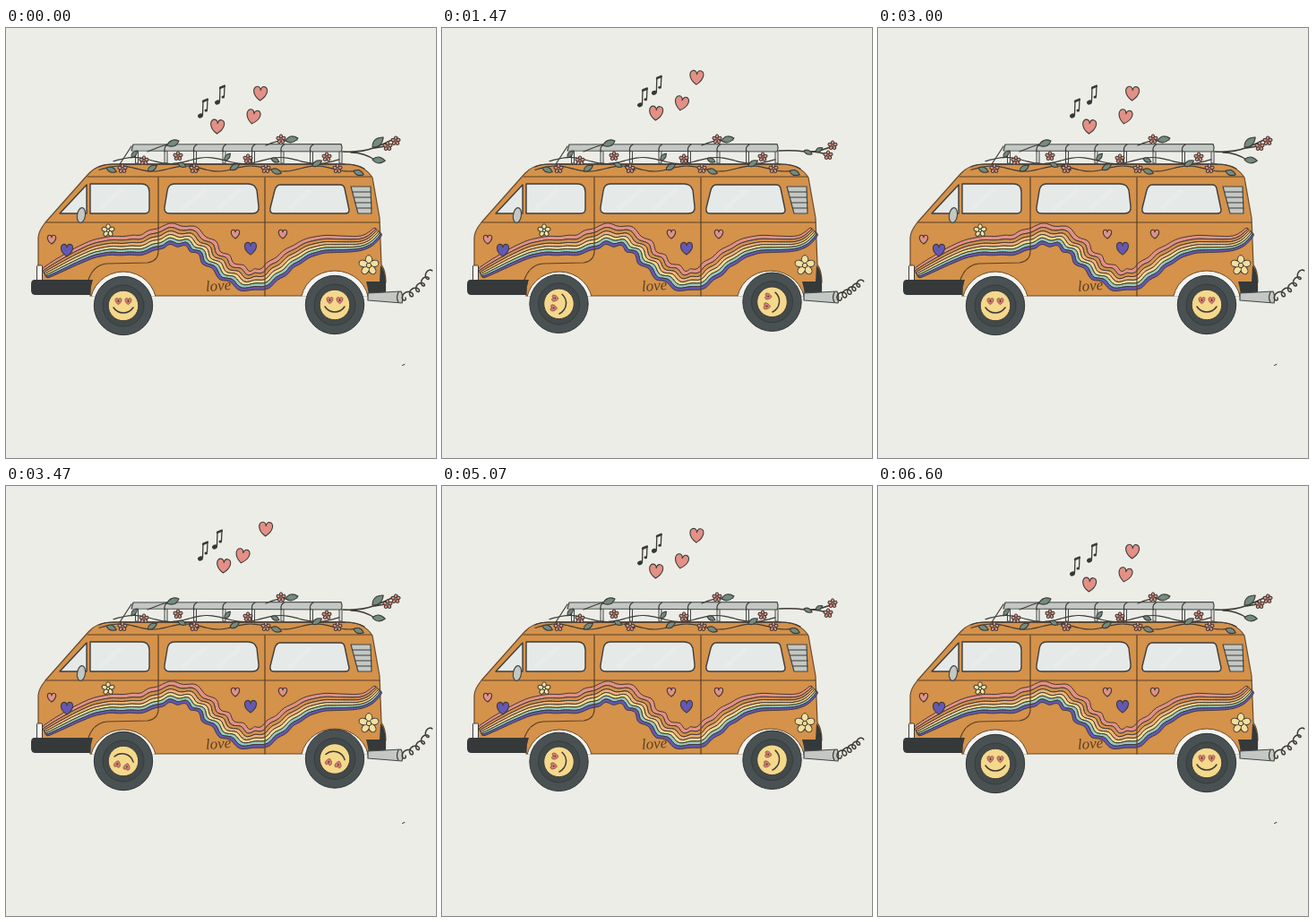
These frames come from a looping animation (480x480 px, 6.67 s). An HTML page:

```html
<!DOCTYPE html>
<html lang="en">
<head>
<meta charset="utf-8">
<title>Flower van</title>
<style>
  html, body { margin: 0; width: 100%; height: 100%; overflow: hidden; background: #ecede7; }
  svg { display: block; width: 100vw; height: 100vh; }
  .ink, .seam { fill: none; stroke: #3f3a36; stroke-width: 1.2; stroke-linecap: round; stroke-linejoin: round; }
  .seam { stroke: #5b4026; }
  .glass { fill: #e5e9e8; stroke: #3f3d3a; stroke-width: 1.4; stroke-linejoin: round; }
  .sheen { fill: none; stroke: #eef0ee; stroke-width: 5; opacity: .5; }
  .metal { fill: #c3c8c4; stroke: #454745; stroke-width: 1.2; stroke-linejoin: round; }
  .part { stroke: #3f3a36; stroke-width: 1; stroke-linejoin: round; }
  .lettering { font: italic 17px "Liberation Serif", serif; fill: #5c4024; }
</style>
</head>
<body>
<svg viewBox="0 0 480 480">
  <defs>
    <clipPath id="aboveSill"><path d="M0 0H480V299.600H0Z"/></clipPath>
  </defs>

  <path d="M36 290V234Q36 227 44 217L91 164Q101 152 118 152H378Q400 152 409 167L417 212L419 264Q424 271 424 284L404 299H94V290Z"
    fill="#d4924b" stroke="#6b4a2b" stroke-width="1.2"/>
  <path class="ink" d="M104 155Q110 152 120 152H378Q392 152 400 157"/>
  <g id="ribbon"></g>

  <path class="seam" d="M91 166H408M45 217H417M170 167V249Q170 260 158 262L113 263Q98 264 92 281M289 167V299"/>
  <g class="glass">
    <path d="M60 207L90 175V207Z"/>
    <path d="M94 174H151Q160 174 160 183V202Q160 207 155 207H94Z"/>
    <path d="M188 174H270Q278 174 280 181L282 199Q283 207 275 207H183Q176 207 177 200L180 182Q181 174 188 174Z"/>
    <path d="M306 175H373Q377 175 378 179L383 203Q383 207 379 207H299Q294 207 295 201L300 181Q302 175 306 175Z"/>
  </g>
  <path class="sheen" d="M104 202L130 180M196 202L224 180M236 202L262 180M316 202L340 181"/>
  <path class="metal" d="M385 177H407L408 207H393Z"/>
  <path class="ink" d="M387 183H407M389 189H407M390 195H408M392 201H408"/>
  <ellipse class="metal" cx="84" cy="209" rx="4.500" ry="8.500" transform="rotate(8 84 209)"/>

  <g clip-path="url(#aboveSill)" fill="#f3f3f0" stroke="#6b4a2b">
    <ellipse cx="131" cy="308" rx="37" ry="36"/>
    <ellipse cx="367" cy="307" rx="38" ry="36"/>
  </g>
  <rect class="part" x="34.500" y="265" width="6" height="17" rx="1" fill="#f4f4f1"/>
  <path d="M32 281H97Q94 289 94 298H33Q28 298 28 293V286Q28 281 32 281Z" fill="#35393a"/>
  <path d="M418 265Q425 272 424 295Q424 298 420 298H405Q404 290 402 283H417Z" fill="#35393a"/>
  <path class="metal" d="M404 296L441 294Q444 300 442 307L404 304Z"/>
  <path class="ink" d="M438 295Q435 301 438 306"/>
  <text class="lettering" x="223" y="293" transform="rotate(-4 238 289)">love</text>

  <g id="rack"></g>
  <g id="garden"></g>
  <g id="motion"></g>
</svg>

<script>
const CORAL = '#e39086', YELLOW = '#f4d88c', TEAL = '#94c9bb', PURPLE = '#6558b4', GREEN = '#718c80';
const HEART = 'M0 1C-1.3 .15-1.05-.95-.45-.95C-.15-.95 0-.65 0-.42C.05-.7 .25-.98 .5-.95C1.1-.9 1.2 .15 0 1Z';
const LEAF = 'M0 0Q.5-.55 1.1 0Q.5 .5 0 0Z';
const el = id => document.getElementById(id);
const range = (n, fn) => Array.from({ length: n }, (_, i) => fn(i));
const join = (n, fn) => range(n, fn).join('');

// Unit shape scaled by s, with an outline of constant weight
const shape = (d, x, y, s, fill, turn = 0, w = 1.1) =>
  `<path class="part" d="${d}" fill="${fill}" style="stroke-width:${w / s}" transform="translate(${x} ${y}) rotate(${turn}) scale(${s})"/>`;
const heart = (x, y, s, fill = CORAL, turn = 0) => shape(HEART, x, y, s, fill, turn);
const leaf = (x, y, turn, s = 11) => shape(LEAF, x, y, s, GREEN, turn);
const line = (d, w = 1.2) => `<path class="ink" style="stroke-width:${w}" d="${d}"/>`;
const dot = (x, y, r, fill, stroke = 'none') => `<circle cx="${x}" cy="${y}" r="${r}" fill="${fill}" stroke="${stroke}"/>`;
const group = (x, y, body, turn = 0) => `<g transform="translate(${x} ${y}) rotate(${turn})">${body}</g>`;

const flower = (x, y, r = 5, fill = CORAL) => group(x, y,
  join(5, i => `<ellipse class="part" cx="${r * .58}" rx="${r * .45}" ry="${r * .34}" fill="${fill}" transform="rotate(${i * 72 - 90})"/>`) +
  dot(0, 0, r * .25, YELLOW, '#3f3a36'));

// Catmull-Rom spline as cubic segments
function spline(p) {
  let d = `M${p[0]}`;
  for (let i = 0; i < p.length - 1; i++) {
    const a = p[i - 1] || p[i], b = p[i], c = p[i + 1], e = p[i + 2] || c;
    const ctrl = (o, u, v, k) => [0, 1].map(j => o[j] + k * (v[j] - u[j]) / 6);
    d += `C${ctrl(b, a, c, 1)} ${ctrl(c, b, e, -1)} ${c}`;
  }
  return d;
}

// Rainbow: bands laid along one curve, rippling most in the middle
const guide = document.createElementNS('http://www.w3.org/2000/svg', 'path');
guide.setAttribute('d', spline([
  [41, 275], [100, 246], [150, 242], [182, 231], [212, 237], [245, 268],
  [280, 282], [322, 254], [350, 242], [398, 240], [417, 225]
]));
const reach = guide.getTotalLength(), STEPS = 150;
function ribbonEdge(k) {
  return range(STEPS + 1, i => {
    const u = i / STEPS, s = u * reach;
    const a = guide.getPointAtLength(s - 4), b = guide.getPointAtLength(s + 4);
    const angle = Math.atan2(b.y - a.y, b.x - a.x);
    const half = 5 + 7 * Math.sqrt(Math.sin(Math.PI * u));
    const ripple = 2.3 * Math.exp(-(((u - .5) / .2) ** 2)) * Math.sin(s / 3.6 + k);
    const off = half * (2 * k - 1) + ripple;
    const x = (a.x + b.x) / 2 - off * Math.sin(angle), y = (a.y + b.y) / 2 + off * Math.cos(angle);
    return `${x.toFixed(1)} ${y.toFixed(1)}`;
  });
}
const colors = [CORAL, '#d4924b', '#eeb27c', YELLOW, TEAL, PURPLE];
const bandAt = i => (i / colors.length) ** .9;
el('ribbon').innerHTML =
  colors.map((fill, i) => `<path class="part" fill="${fill}" d="M${ribbonEdge(bandAt(i)).join('L')}L${ribbonEdge(bandAt(i + 1)).reverse().join('L')}Z"/>`).join('') +
  [51, 256, 309].map(x => heart(x, x < 99 ? 236 : 230, 5)).join('') +
  heart(68, 248, 7, PURPLE) + heart(273, 246, 7, PURPLE) +
  flower(114, 226, 7, '#f1e3a7') + flower(405, 265, 11, '#f3dfa0');

const postX = i => 146 + 32.5 * i;
el('rack').innerHTML =
  line('M140 132L127 152H378') +
  join(8, i => `<path d="M${postX(i) - 1.5} 137h3v14h-3z" fill="#e4e6e2" stroke="#454745"/>`) +
  '<path class="metal" d="M142 130L374 129.500Q376 134 374 138L140 137Z"/>' +
  join(6, i => line(`M${postX(i + 1) + 2} 130q-5 3-3 8`));

// Garland on the roof edge and a looser strand through the rack
const garlandY = x => 157 + 3 * Math.sin(x / 11.6);
const strandY = x => 148 + 3.5 * Math.sin(x / 13);
const strand = (fn, from, to) => line(spline(range(40, i => from + (to - from) * i / 39).map(x => [x, fn(x)])));
el('garden').innerHTML =
  strand(garlandY, 104, 394) + strand(strandY, 120, 372) +
  line('M158 138Q172 132 186 128M290 131Q304 124 325 125') +
  join(7, i => leaf(112 + 46 * i, garlandY(112 + 46 * i), i % 2 ? -30 : 20)) +
  join(4, i => leaf(140 + 52 * i, strandY(140 + 52 * i), i % 2 ? 25 : -50, 9)) +
  leaf(193, 126, 160, 13) + leaf(312, 126, -12, 13) +
  join(4, i => flower(130 + 80 * i, 157)) +
  [[154, 148], [192, 143], [270, 146], [307, 124], [358, 144]].map(p => flower(...p)).join('');

const note = (x, y) => group(x, y,
  '<ellipse rx="3" ry="2.400" fill="#34383a" transform="rotate(-25)"/>' +
  line('M2.500-1L3-17L8-19L7.500-7', 1.3) + line('M3-16L8-18', 2.2) +
  '<ellipse cx="6.300" cy="-6" rx="1.800" ry="1.500" fill="#34383a"/>');

const wheel = (x, y, turn) => group(x, y,
  dot(0, 0, 32.7, '#4a5153', '#303537') + dot(0, 0, 23, '#42494b', '#363c3e') + dot(0, 0, 16.8, YELLOW, '#3f3a36') +
  group(0, 0,
    [-5.5, 5.5].map(u => shape(HEART, u, -5, 3.8, '#dd7a6b', 0, .5) + dot(u, -5, .9, '#3f3a36')).join('') +
    line('M-11 2Q-7 8 0 8T11 2', 1.5), turn));

// Looping exhaust smoke along a bent line
const smoke = (x, y, bend) => line('M' + range(121, i => {
  const u = i / 120, a = u * Math.PI * 10, r = 4 - u * 1.3, sag = bend * u * (1 - u);
  return `${442 + (x - 444) * u + sag + r * Math.cos(a)} ${301 + (y - 301) * u + sag + r * Math.sin(a)}`;
}).join('L'), 1.5);

const branchUp =
  line('M376 138Q397 139 410 134T437 122M385 139Q400 139 413 148M411 134L430 131', 1.5) +
  leaf(409, 133, -42, 15) + leaf(409, 147, 5, 13) +
  flower(426, 132) + flower(435, 126) +
  line('M442.500 376.500L445 375.500', 1);
const branchFlat =
  line('M376 137Q392 136 405 138T438 131M410 138Q422 138 431 142', 1.5) +
  leaf(404, 137, 22, 9) + leaf(417, 138, -28, 8) +
  flower(431, 142) + flower(436, 131);

// Pose p of four: wheels turn back, hearts and notes rise and slow down
function pose(p) {
  const rise = (1 - .4 ** p) / .84, odd = p % 2;
  return '<g visibility="hidden">' +
    wheel(131 - odd * .5, 310 - 3 * rise, -82 * p) + wheel(367 + odd * 1.5, 309 - 4.5 * rise, -82 * p) +
    heart(236 + 7 * rise - 2 * odd, 110 - 21 * rise, 8, CORAL, 4) +
    heart(276 - 12 * rise, 99 - 21 * rise, 8, CORAL, 12) +
    heart(284 + 6 * rise - 4 * odd, 73 - 25 * rise, 8, CORAL, 3) +
    note(217 + 4 * odd, 98 - 17 * rise) + note(236 - 3 * rise + 3 * odd, 83 - 15 * rise) +
    (odd ? branchFlat + smoke(470, 283, 4) : branchUp + smoke(475, 271, 14)) + '</g>';
}
el('motion').innerHTML = join(4, pose);

// Poses advance at about 12 per second, shown on a 15 per second grid
const LOOP = 6670, POSES_PER_TICK = .812;
const groups = [...el('motion').children];
let shown = -1;
function draw(now) {
  const tick = Math.floor(((now % LOOP) + 3.4) * 15 / 1000) % 100;
  const current = Math.floor(tick * POSES_PER_TICK) % 4;
  if (current === shown) return;
  groups.forEach((g, i) => g.setAttribute('visibility', i === current ? 'visible' : 'hidden'));
  shown = current;
}
const start = performance.now();
function frame() {
  draw(performance.now() - start);
  requestAnimationFrame(frame);
}
frame();
</script>
</body>
</html>
```
